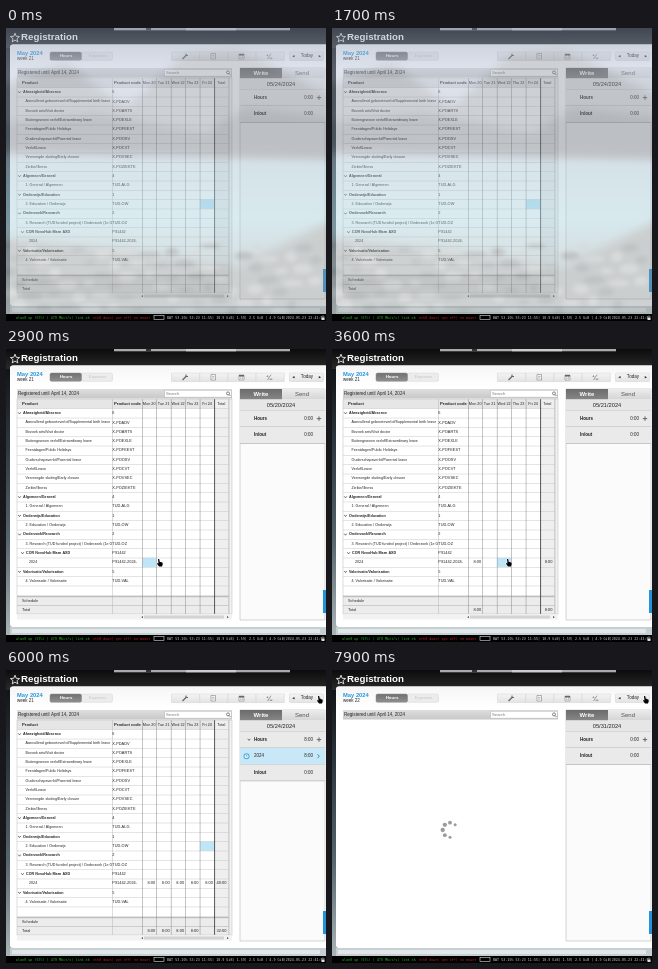
Write an HTML page with a canvas that moves like this. It is 320 px wide and 293 px high and loops after 8 s.

```html
<!DOCTYPE html>
<html lang="en">
<head>
<meta charset="utf-8">
<title>Registration</title>
<style>
html, body { margin: 0; width: 100%; height: 100%; overflow: hidden; background: #000; }
canvas { display: block; }
</style>
</head>
<body>
<canvas id="stage" width="320" height="293"></canvas>
<script>
const stage = document.getElementById('stage').getContext('2d');
let ctx = stage;
const LOOP = 8000, FOCUS = 1800, RELOAD = 6600;
const ROW_TOP = 59.5, ROW_H = 9.33;
const SANS = '"Liberation Sans", Arial, sans-serif';
const MONO = '"DejaVu Sans Mono", monospace';
const dayX = i => 136 + i * 14.45;
const rowY = i => ROW_TOP + i * ROW_H;

// level 0: group, 1: activity, 2: subgroup, 3: sub-activity
const rows = [
  [0, 'Afwezigheid/Absence', '6'],
  [1, 'Aanvullend geboorteverlof/Supplemental birth leave', 'X-PDADV'],
  [1, 'Bezoek arts/Visit doctor', 'X-POARTS'],
  [1, 'Buitengewoon verlof/Extraordinary leave', 'X-POEXLE'],
  [1, 'Feestdagen/Public Holidays', 'X-POFEEST'],
  [1, 'Ouderschapsverlof/Parental leave', 'X-POOSV'],
  [1, 'Verlof/Leave', 'X-POCVT'],
  [1, 'Vervroegde sluiting/Early closure', 'X-POVSEC'],
  [1, 'Ziekte/Illness', 'X-POZIEKTE'],
  [0, 'Algemeen/General', '4'],
  [1, '1. General / Algemeen', 'TUD-ALG'],
  [0, 'Onderwijs/Education', '1'],
  [1, '2. Education / Onderwijs', 'TUD-OW'],
  [0, 'Onderzoek/Research', '2'],
  [1, '3. Research (TUD funded project) / Onderzoek (1e G', 'TUD-OZ'],
  [2, 'COR NevoHub Marn AXD', 'P91442'],
  [3, '2024', 'P91442-2024-'],
  [0, 'Valorisatie/Valorisation', '5'],
  [1, '4. Valorisatie / Valorisatie', 'TUD-VAL']
];
const days = ['Mon 20', 'Tue 21', 'Wed 22', 'Thu 23', 'Fri 24'];

// Timelines: each entry starts with its time in ms
const selected = [[0, 4, 12], [2000, 0, 16], [3000, 1, 16], [3600, 2, 16],
  [4200, 3, 16], [4900, 4, 16], [5500, 4, 12]];
const details = [[0, '05/24'], [2200, '05/20'], [3100, '05/20', 1], [3300, '05/21'],
  [3800, '05/21', 1], [3900, '05/22'], [4300, '05/22', 1], [4400, '05/23'],
  [5200, '05/23', 1], [5300, '05/24'], [6000, '05/24', 1], [7300, '05/31']];
const entered = [3000, 3700, 4200, 5100, 6000];
const summed = [3100, 3800, 4300, 5200, 6100];
const pointer = [[1800, 142, 214], [2700, 142, 214], [3000, 160, 214], [3300, 160, 214],
  [3600, 177, 214], [3900, 177, 214], [4200, 188, 214], [4500, 188, 214], [4800, 201, 214],
  [5100, 201, 214], [5400, 201, 176], [5800, 314, 30], [8000, 314, 30]];

const current = (list, t) => list.filter(e => e[0] <= t).pop();

function pointerAt(t) {
  const i = Math.max(1, pointer.findIndex(p => p[0] >= t));
  const [t0, x0, y0] = pointer[i - 1], [t1, x1, y1] = pointer[i];
  const k = (t - t0) / (t1 - t0);
  return [x0 + (x1 - x0) * k, y0 + (y1 - y0) * k];
}

function rect(x, y, w, h, fill) {
  ctx.fillStyle = fill;
  ctx.fillRect(x, y, w, h);
}

function fade(y0, y1, ...colors) {
  const g = ctx.createLinearGradient(0, y0, 0, y1);
  colors.forEach((c, i) => g.addColorStop(i / (colors.length - 1), c));
  return g;
}

function box(x, y, w, h, fill, border, radius = 0) {
  ctx.beginPath();
  ctx.roundRect(x, y, w, h, radius);
  ctx.fillStyle = fill;
  ctx.fill();
  if (border) { ctx.strokeStyle = border; ctx.lineWidth = 0.5; ctx.stroke(); }
}

function path(points, color, width = 0.7, closed) {
  ctx.beginPath();
  for (let i = 0; i < points.length; i += 2) ctx.lineTo(points[i], points[i + 1]);
  if (closed) ctx.closePath();
  ctx.strokeStyle = color;
  ctx.lineWidth = width;
  ctx.stroke();
}

function shape(points, fill) {
  ctx.beginPath();
  for (let i = 0; i < points.length; i += 2) ctx.lineTo(points[i], points[i + 1]);
  ctx.fillStyle = fill;
  ctx.fill();
}

function dot(x, y, r, color) {
  ctx.beginPath();
  ctx.arc(x, y, r, 0, 7);
  ctx.fillStyle = color;
  ctx.fill();
}

// Laid out at ten times the size so tiny glyph advances stay exact
function text(s, x, y, size, { color = '#222', align = 'left', bold = false, font = SANS } = {}) {
  ctx.save();
  ctx.translate(x, y);
  ctx.scale(0.1, 0.1);
  ctx.font = `${bold ? 'bold ' : ''}${size * 10}px ${font}`;
  ctx.textAlign = align;
  ctx.textBaseline = 'middle';
  ctx.fillStyle = color;
  ctx.fillText(s, 0, 0);
  ctx.restore();
}

function chevron(x, y) {
  path([x - 1.3, y - 0.8, x, y + 0.8, x + 1.3, y - 0.8], '#333');
}

function drawFrame() {
  rect(0, 0, 320, 286, fade(0, 286, '#0c0c0c', '#2c3840', '#56666e', '#a9b4b6'));
  rect(0, 0, 320, 20, fade(0, 20, '#0c0c0c', '#2a2a2a'));
  rect(108, 0, 176, 2.3, '#aaa');
  rect(140, 0, 5, 2.3, '#333');
  rect(180, 0, 50, 2.3, '#ccc');
  box(4, 16.5, 318, 261.5, '#fff', null, 3);
  box(4, 16.5, 318, 20, fade(17, 37, '#f6f6f6', '#fff'), null, 3);
  rect(4, 278, 316, 8, '#c6cfd1');
  rect(6, 280, 308, 4, '#e2e8e9');
  const star = [];
  for (let i = 0; i < 10; i++) {
    const r = i % 2 ? 2.1 : 4.8, a = -Math.PI / 2 + i * Math.PI / 5;
    star.push(9 + r * Math.cos(a), 10 + r * Math.sin(a));
  }
  path(star, '#fff', 0.8, true);
  text('Registration', 15, 9.8, 9.75, { color: '#fff', bold: true });
}

function drawToolbar(t) {
  text('May 2024', 11, 25.3, 5.8, { color: '#2196e0', bold: true });
  text(t < RELOAD ? 'week 21' : 'week 22', 11, 31.2, 4.5);
  box(75.5, 24, 31, 8.3, '#ececec', '#d4d4d4', 1.5);
  box(44, 24, 31.5, 8.3, fade(24, 32, '#707070', '#8e8e8e'), '#888', 1.5);
  text('Hours', 60, 28.1, 4.4, { color: '#fff', bold: true, align: 'center' });
  text('Expenses', 91.5, 28.1, 4, { color: '#c3c3c3', align: 'center' });
  const face = fade(23, 33, '#f6f6f6', '#e2e2e2');
  for (let i = 0; i < 4; i++) box(165.5 + i * 28.2, 24, 28.2, 8.5, face, '#d0d0d0');
  const ink = '#666';
  path([176.5, 31, 180.5, 27], ink, 1.3);
  path([180, 25.5, 180, 27.5, 182, 27.5], ink, 1);
  box(205, 25.5, 4.5, 5.5, '#fff', ink);
  path([206, 27.3, 208.5, 27.3], ink, 0.5);
  path([206, 29, 208.5, 29], ink, 0.5);
  box(233, 26, 5, 5, '#fff', ink);
  rect(233, 26, 5, 1.5, ink);
  text('14', 235.5, 29.5, 2.8, { align: 'center', color: ink });
  text('+', 261.3, 27.3, 4, { align: 'center', color: ink, bold: true });
  path([261.5, 31, 265, 25.7], ink, 0.6);
  path([263.7, 30.2, 266.3, 30.2], ink, 0.8);
  box(283.5, 24, 34, 8.5, face, '#d0d0d0', 1);
  text('Today', 301, 28.1, 4.6, { align: 'center' });
  text('◀', 287.5, 28.3, 3, { align: 'center' });
  text('▶', 314, 28.3, 3, { align: 'center' });
  rect(11, 40, 215, 9.5, fade(40, 49.5, '#dedede', '#c8c8c8'));
  text('Registered until April 14, 2024', 12, 44.7, 4.55);
  box(158.5, 41.3, 67, 7, '#fff', '#aaa');
  text('Search', 160, 45, 4.2, { color: '#777' });
  ctx.beginPath();
  ctx.arc(222, 44.4, 1.5, 0, 7);
  ctx.strokeStyle = ink;
  ctx.lineWidth = 0.8;
  ctx.stroke();
  path([223, 45.5, 224.5, 47], ink, 0.9);
}

function drawTable(t) {
  rect(11, 50, 215, 215, '#fff');
  rect(11, 50, 215, 9.5, '#e6e6e6');
  rect(208.3, 50, 14.2, 215, '#efefef');
  rect(222.5, 50, 3.5, 215, '#f2f2f2');
  rect(11, 247.5, 211.5, 17.5, '#ececec');
  const [, col, row] = current(selected, t);
  rect(dayX(col), rowY(row), 14.45, ROW_H, '#bfe6f7');

  for (let i = 0; i <= 20; i++) rect(11, rowY(i), 211.5, 0.4, '#bbb');
  rect(11, 247.5, 211.5, 0.6, '#888');
  rect(11, 256.5, 211.5, 0.5, '#aaa');
  rect(106, 50, 0.4, 215, '#aaa');
  for (let i = 0; i < 7; i++) rect(dayX(i), 50, i === 5 ? 0.8 : 0.5, 215, i === 5 ? '#333' : '#888');
  ctx.strokeStyle = '#bbb';
  ctx.lineWidth = 0.5;
  ctx.strokeRect(11, 50, 215, 215);
  rect(11, 265.5, 215, 5, '#f2f2f2');
  rect(138, 266.5, 80, 3, '#d4d4d4');
  text('◂', 137, 268, 3.5, { align: 'right' });
  text('▸', 221, 268, 3.5);

  text('Product', 16, 54.6, 4.2, { bold: true });
  text('Product code', 108, 54.6, 4.2, { bold: true });
  days.forEach((d, i) => text(d, dayX(i) + 7.2, 54.6, 3.8, { align: 'center' }));
  text('Total', 215.3, 54.6, 3.8, { align: 'center' });

  rows.forEach(([level, name, code], i) => {
    const y = rowY(i) + 4.6, group = level % 2 === 0;
    if (group) chevron(level ? 16.5 : 13.5, y);
    ctx.save();
    ctx.beginPath();
    ctx.rect(11, y - 5, 95, 10);
    ctx.clip();
    text(name, [17, 19.5, 20, 23][level], y, 3.7, { bold: group });
    ctx.restore();
    text(code, 106.3, y, 3.9);
  });
  text('Schedule', 16, 252.4, 3.9);
  text('Total', 16, 261.2, 3.9);
  drawHours(entered, t, rowY(16) + 4.6);
  drawHours(summed, t, 261.2);
}

function drawHours(times, t, y) {
  const done = times.filter(v => v <= t).length;
  for (let i = 0; i < done; i++) text('8:00', dayX(i) + 13.2, y, 4, { align: 'right' });
  if (done) text(`${done * 8}:00`, 220.5, y, 4, { align: 'right' });
}

function drawPanel(t) {
  const [, date, filled] = current(details, t);
  box(234, 40, 85, 231, '#fbfbfb', '#aaa');
  rect(276, 40, 43, 10.5, fade(40, 50, '#ececec', '#d6d6d6'));
  rect(234, 40, 42, 10.5, fade(40, 50, '#6b6b6b', '#858585'));
  text('Write', 255, 45.3, 6, { color: '#fff', bold: true, align: 'center' });
  text('Send', 296, 45.3, 6, { color: '#555', align: 'center' });
  rect(234, 50.5, 85, 11, '#e6e6e6');
  text(date + '/2024', 275, 56, 5.7, { align: 'center' });

  const line = (y, label, value, bold = true) => {
    rect(234, y, 85, 16.5, label === '2024' ? '#c9e8f7' : '#eaeaea');
    rect(234, y + 16.1, 85, 0.6, '#aaa');
    text(label, 248, y + 8, 4.5, { bold });
    text(value, 307, y + 8, 4.5, { align: 'right' });
  };
  rect(234, 61.2, 85, 0.6, '#aaa');
  line(61.5, 'Hours', filled ? '8:00' : '0:00');
  path([310.8, 69.6, 315.2, 69.6], '#666', 1);
  path([313, 67.4, 313, 71.8], '#666', 1);
  if (filled) {
    chevron(243, 69.6);
    line(78, '2024', '8:00', false);
    dot(240.5, 86.2, 3, '#4aa9dd');
    dot(240.5, 86.2, 2, '#dff2fb');
    path([240.5, 84.8, 240.5, 86.3, 241.6, 86.3], '#2c83b5', 0.5);
    path([311.5, 84.2, 313.3, 86.2, 311.5, 88.2], '#2c83b5', 0.9);
  }
  line(filled ? 94.5 : 78, 'In/out', '0:00');
  rect(317, 241, 3, 23, '#2491d8');
}

function drawSpinner(t) {
  const head = Math.floor((t - 7900) / 100);
  for (let i = 0; i < 6; i++) {
    const a = (head + i + 2) * Math.PI / 4;
    dot(118 + 7.3 * Math.cos(a), 160 + 7.3 * Math.sin(a), 1.5 + 0.7 * Math.sin(Math.PI * i / 5), '#9c9c9c');
  }
}

// Mountain lake wallpaper showing through the unfocused window
function paintWallpaper() {
  ctx = new OffscreenCanvas(320, 293).getContext('2d');
  rect(0, 0, 320, 293, fade(0, 286, '#8c9ab4', '#b4c0d6', '#a8b2c2', '#a3c4d2', '#a8d2de', '#9fb2b8', '#8f9596'));
  ctx.filter = 'blur(5px)';
  shape([-10, 60, 60, 35, 120, 80, 180, 25, 230, 20, 330, 70, 330, 130, -10, 125], '#8a929e');
  shape([-10, 95, 90, 85, 200, 105, 240, 80, 330, 90, 330, 130, -10, 122], '#68717c');
  shape([-10, 210, 110, 222, 230, 240, 330, 190, 330, 300, -10, 300], '#8b9294');
  ctx.filter = 'blur(2px)';
  for (let i = 0; i < 70; i++) {
    const x = i * 83 % 320, y = 218 + i * 37 % 68;
    ctx.beginPath();
    ctx.ellipse(x, y, 5 + i % 7, 2 + i % 4, 0, 0, 7);
    ctx.fillStyle = i % 2 ? '#a9afb0' : '#6f7676';
    ctx.fill();
  }
  const { canvas } = ctx;
  ctx = stage;
  return canvas;
}

function drawWallpaper() {
  ctx.globalAlpha = 0.42;
  ctx.drawImage(wallpaper, 0, 0);
  ctx.globalAlpha = 1;
}

function drawStatus() {
  rect(0, 286, 320, 7, '#000');
  const mono = (s, x, color) => text(s, x, 289.8, 3.4, { color, font: MONO });
  mono('wlan0 up (67%) | 478 Mbit/s| link ok', 10, '#2fae2f');
  mono('eth0 down| vpn off| no mount', 87, '#c02020');
  ctx.strokeStyle = '#ddd';
  ctx.lineWidth = 0.6;
  ctx.strokeRect(148, 287.5, 10, 4);
  mono('BAT 53.10% 53:23 11:55| 10.9 GiB| 1.59| 2.5 GiB | 4.9 GiB|2024-05-23 22:41:55', 161, '#ccc');
  rect(315.5, 289.5, 3, 2.5, '#ddd');
  box(316, 287.8, 2, 2, '#000', '#ddd', 1);
}

function drawPointer(t) {
  const [x, y] = pointerAt(t);
  ctx.save();
  ctx.translate(x, y);
  const hand = [-2, -4, -0.8, -4, -0.3, -1.2, 2.4, -0.4, 2.8, 1, 2, 3.5, -1, 3.5, -3, 0.8, -2.4, 0, -1.5, 0.6];
  path(hand, '#fff', 0.8, true);
  shape(hand, '#000');
  ctx.restore();
}

const wallpaper = paintWallpaper();
const start = performance.now();

function draw() {
  const t = Math.floor(((performance.now() - start) % LOOP) / 100) * 100;
  drawFrame();
  drawToolbar(t);
  if (t < RELOAD) drawTable(t);
  else drawSpinner(t);
  drawPanel(t);
  if (t < FOCUS) drawWallpaper();
  else drawPointer(t);
  drawStatus();
  requestAnimationFrame(draw);
}
draw();
</script>
</body>
</html>
```
